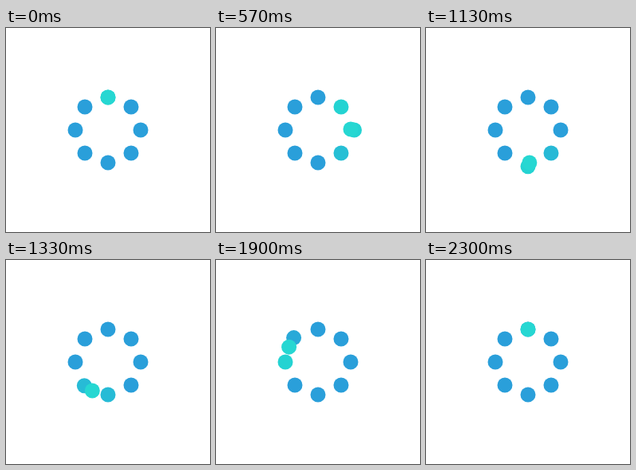
An HTML page with a canvas for the animation above (2330 ms loop, 256 by 256 pixels).

```html
<!DOCTYPE html>
<html>
<head>
<meta charset="utf-8">
<style>
  html, body { margin: 0; height: 100%; overflow: hidden; background: #fff; }
  canvas { display: block; }
</style>
</head>
<body>
<canvas id="stage" width="256" height="256"></canvas>
<script>
const ctx = document.getElementById('stage').getContext('2d');
const LOOP = 2330, STEPS = 69, CENTER = 128, RING = 41, RADIUS = 9.5;
const BLUE = [42, 159, 218], CYAN = [36, 211, 210], RUNNER = 'rgb(38,215,210)';

// Tint of each dot, in steps: fade-in start, full, fade-out start, end
const TINTS = [
  [-2, -1, 7, 16], [6, 10, 17, 27], [4, 17, 19, 28], [3, 26, 29, 39],
  [30, 33, 35, 46], [34, 45, 46, 56], [48, 52, 57, 67], [56, 61, 62, 69]
];

const clamp = (v, max = 1) => Math.max(0, Math.min(max, v));

function tint(step, [start, full, hold, end]) {
  return Math.min(clamp((step - start) / (full - start)), clamp((end - step) / (end - hold)));
}

// Outward nudge as the runner passes: quick out, slower back
function nudge(step, index) {
  const age = step - Math.max(0, 8.25 * index - 1.75);
  return clamp(Math.min(2 * age, 1.3 * (6.4 - age)), 5);
}

function dot(turn, distance, color) {
  const angle = turn * 2 * Math.PI;
  ctx.fillStyle = color;
  ctx.beginPath();
  ctx.arc(CENTER + distance * Math.sin(angle), CENTER - distance * Math.cos(angle), RADIUS, 0, 2 * Math.PI);
  ctx.fill();
}

function draw(now) {
  const step = Math.floor((now % LOOP) * 0.03 + 0.11);
  ctx.fillStyle = '#fff';
  ctx.fillRect(0, 0, 256, 256);
  TINTS.forEach((keys, i) => {
    const mix = tint(step, keys);
    const color = BLUE.map((c, j) => Math.round(c + (CYAN[j] - c) * mix));
    dot(i / 8, RING + nudge(step, i), `rgb(${color})`);
  });
  dot(step / STEPS, RING, RUNNER);
}

let origin;
function tick(now) {
  origin ??= now;
  draw(now - origin);
  requestAnimationFrame(tick);
}
draw(0);
requestAnimationFrame(tick);
</script>
</body>
</html>
```
